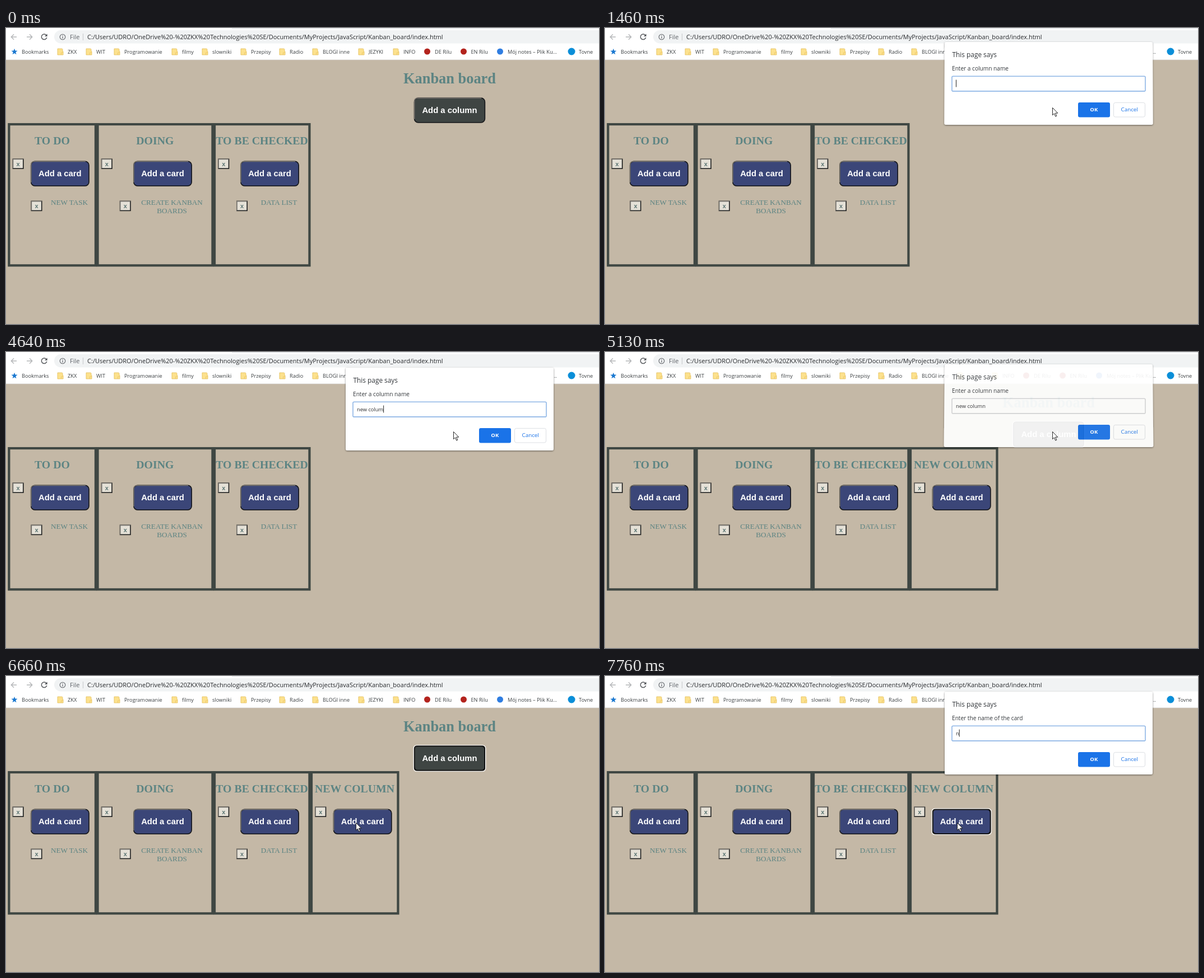
Animation of 1058 by 529 pixels, one loop 7990 ms. Source, as an HTML page:

```html
<!DOCTYPE html>
<html lang="en">
<head>
<meta charset="utf-8">
<title>Kanban board</title>
<style>
  html, body { margin: 0; width: 100%; height: 100%; overflow: hidden; background: #c4b8a6; }
  svg { display: block; width: 100vw; height: 100vh; }
  text { white-space: pre; }
  .ui { font-family: "Open Sans", "Noto Sans", sans-serif; }
  .serif { font-family: "Liberation Serif", "Times New Roman", serif; fill: #5c8483; text-anchor: middle; }
  .btn { font: bold 14.85px "Liberation Sans", Arial, sans-serif; fill: #fff; text-anchor: middle; }
  .x { font: bold 11px "Liberation Sans", Arial, sans-serif; fill: #5d7674; text-anchor: middle; }
</style>
</head>
<body>
<svg id="stage" viewBox="0 0 1058 529" xmlns="http://www.w3.org/2000/svg"></svg>
<script>
const LOOP = 7990;
const stage = document.getElementById('stage');
const $ = id => document.getElementById(id);

// --- drawing helpers ---
const rect = (x, y, w, h, attrs) => `<rect x="${x}" y="${y}" width="${w}" height="${h}" ${attrs}/>`;
const circle = (x, y, r, attrs) => `<circle cx="${x}" cy="${y}" r="${r}" ${attrs}/>`;
const text = (x, y, str, cls, attrs = '') => `<text x="${x}" y="${y}" class="${cls}" ${attrs}>${str}</text>`;
const ui = (x, y, str, size, fill, attrs = '') =>
  text(x, y, str, 'ui', `font-size="${size}" fill="${fill}" ${attrs}`);

function button(x, y, w, fill, label, id) {
  const h = 45.5, r = 7;
  const lit = `M${x + 1},${y + h - r}V${y + r}Q${x + 1},${y + 1} ${x + r},${y + 1}H${x + w - r}`;
  const ring = id
    ? `<g id="${id}" fill="none">` +
      rect(x - .4, y - .4, w + .8, h + .8, 'rx="5" stroke="#fff" stroke-width="1.3"') +
      rect(x + 1.1, y + 1.1, w - 2.2, h - 2.2, 'rx="4" stroke="#101010" stroke-width="1.8"') + '</g>'
    : '';
  return rect(x + .8, y + .8, w - 1.6, h - 1.6, `rx="${r}" fill="${fill}" stroke="#16171a" stroke-width="1.6"`) +
    `<path d="${lit}" fill="none" stroke="#77736d" stroke-width="1.6"/>` + ring +
    text(x + w / 2, y + 27.5, label, 'btn');
}

function closeBox(x, y) {
  return rect(x, y, 20, 18.5, 'fill="#1d1e1e"') +
    `<path d="M${x},${y + 18.5}V${y}H${x + 20}l-1.6,1.6H${x + 1.6}V${y + 16.9}Z" fill="#77736d"/>` +
    rect(x + 1.6, y + 1.6, 16.8, 15.3, 'fill="#e5e1d7"') +
    text(x + 10, y + 13, 'x', 'x');
}

function column(left, right, title, btnX, focusId) {
  return rect(left + 2.05, 172.05, right - left - 4.1 + 1, 252.3, 'fill="none" stroke="#3f4743" stroke-width="4.2"') +
    text((left + right) / 2 + .3, 208, title, 'serif', 'font-size="19.8" font-weight="bold"') +
    closeBox(left + 8.3, 233.5) +
    button(btnX, 237.5, 105, '#3b4678', 'Add a card', focusId);
}

const task = (boxX, x, lines) => closeBox(boxX, 308.7) +
  lines.map((s, i) => text(x, 316 + i * 15, s, 'serif', 'font-size="13.2"')).join('');

// --- browser bar ---
function browserBar() {
  const url = 'C:/Users/UDRO/OneDrive%20-%20ZKX%20Technologies%20SE/Documents/MyProjects/JavaScript/Kanban_board/index.html';
  const folders = [[110, 'ZKX'], [161, 'WIT'], [211, 'Programowanie'], [314, 'filmy'], [368, 'slowniki'],
    [437, 'Przepisy'], [506, 'Radio'], [565, 'BLOGI inne'], [647, 'JEZYKI'], [709, 'INFO']];
  const sites = [[751.5, 5.5, '#b3231d', 765, 'DE Rilu'], [816.5, 5.5, '#b3231d', 829.5, 'EN Rilu'],
    [881.5, 5.5, '#2f7de1', 895, 'Mój notes – Plik Ku...'], [1009, 6.5, '#0a8ed8', 1022, 'Tovne']];
  const label = (x, s) => ui(x, 45.5, s, 9.2, '#3c4043');
  const folder = x => `<path d="M${x + .5},37H${x + 8}q1.5,0 1.5,1.5V42h1v6H${x + .5}Z" fill="#fce18d" stroke="#e3bd5a" stroke-width=".8"/>` +
    `<path d="M${x + 7},48v-4h3.5" fill="none" stroke="#e9c566" stroke-width=".8"/>`;
  let star = '';
  for (let i = 0; i < 10; i++) {
    const a = Math.PI * (i / 5 - .5), r = i % 2 ? 2.4 : 5.8;
    star += `${15 + r * Math.cos(a)},${42.5 + r * Math.sin(a)} `;
  }
  return rect(0, 0, 1058, 57, 'fill="#fff"') +
    rect(403, 0, 655, 1, 'fill="#dee1e6"') +
    rect(0, 56.4, 1058, .8, 'fill="#dddcd9"') +
    rect(86, 4, 1000, 23.4, 'rx="11.7" fill="#f1f3f4"') +
    '<g fill="none" stroke-width="1.4">' +
    '<path d="M19,16H9.5M14,11.3L9.3,16L14,20.7M37,16h9.5M42,11.3L46.7,16L42,20.7" stroke="#b4b6b8"/>' +
    '<path d="M72.2,13.2A4.8,4.8 0 1 0 72.8,17" stroke="#55585c" stroke-width="1.5"/>' +
    circle(101, 16, 4.8, 'stroke="#5f6368" stroke-width="1.1"') +
    '<path d="M101,15.2V18.8M101,13V14.3" stroke="#5f6368" stroke-width="1.2"/></g>' +
    '<path d="M73.6,10.4V15H69Z" fill="#55585c"/>' +
    ui(114, 19.8, 'File', 11, '#5f6368') +
    rect(137, 10, 1, 12, 'fill="#c6c8ca"') +
    ui(145, 19.8, url, 11.03, '#27292c') +
    `<polygon points="${star}" fill="#1a78d0"/>` + label(28, 'Bookmarks') +
    folders.map(([x, s]) => folder(x - 18.5) + label(x, s)).join('') +
    sites.map(([cx, r, fill, x, s]) => circle(cx, 42, r, `fill="${fill}"`) + label(x, s)).join('');
}

// --- prompt window ---
const prompt = '<g id="dialog">' +
  '<path id="sheet" fill="#fff" filter="url(#shadow)"/>' +
  ui(619.5, 55, 'This page says', 11.85, '#33373b') +
  ui(619, 78.7, '', 10.13, '#33373b', 'id="question"') +
  rect(619, 89.3, 345, 26.6, 'id="field" rx="2" fill="#fff" stroke-width="1.6"') +
  ui(626, 106, '', 9.3, '#2b2d30', 'id="typed"') +
  rect(626, 95.5, 1, 13, 'id="caret" fill="#222"') +
  rect(844, 136, 57, 26.4, 'rx="3" fill="#1a73e8"') +
  ui(872.3, 152.4, 'OK', 9.6, '#fff', 'font-weight="700" text-anchor="middle"') +
  rect(907.5, 136.4, 56, 25.6, 'rx="3" fill="#fff" stroke="#dcdfe3" stroke-width="1"') +
  ui(935.7, 152.4, 'Cancel', 9.8, '#1a73e8', 'text-anchor="middle"') + '</g>';

stage.innerHTML =
  '<defs><filter id="shadow" x="-5%" y="-10%" width="110%" height="122%">' +
  '<feDropShadow dx="0" dy="1" stdDeviation="1.5" flood-color="#000" flood-opacity=".5"/></filter></defs>' +
  rect(0, 0, 1058, 529, 'fill="#c4b8a6"') +
  text(791.5, 99, 'Kanban board', 'serif', 'font-size="26.4" font-weight="bold"') +
  button(727.7, 124.3, 127.5, '#3f4543', 'Add a column', 'columnFocus') +
  column(3.3, 161, 'TO DO', 43.8) + task(44.5, 113, ['NEW TASK']) +
  column(161.5, 369.5, 'DOING', 227) + task(202.8, 296, ['CREATE KANBAN', 'BOARDS']) +
  column(370, 542.5, 'TO BE CHECKED', 418) + task(411, 487, ['DATA LIST']) +
  '<g id="newColumn">' + column(543, 700.5, 'NEW COLUMN', 583.7, 'cardFocus') + '</g>' +
  browserBar() + prompt +
  '<path id="cursor" d="M0,0V13.2L3,10.4L5.2,15.6L7.3,14.7L5.1,9.6H9.3Z" fill="#fff" stroke="#111" stroke-width=".9" stroke-linejoin="round"/>';

// --- timeline ---
// Window poses: start time, vertical shift, opacity
const poses = [
  [0, 0, 0], [1300, -11, .25], [1380, -6, .72], [1460, -3, 1], [1540, 0, 1],
  [5040, -2, 1], [5130, -6, .93], [5200, -11, .4], [5280, 0, 0],
  [6900, -11, .25], [6990, -6.4, .72], [7070, 0, 1]
];
const keys = [2860, 3010, 3160, 3310, 3860, 3940, 4170, 4340, 4640, 4820];
const toColumn = [[868, 82], [866, 98], [858, 125], [845, 155], [830, 176], [818, 183],
  [810, 178], [804, 166], [800, 153], [798, 145], [798, 142]];
const toCard = [[775, 141], [722, 157], [650, 190], [578, 230], [538, 254], [531, 263],
  [552, 265], [585, 265], [610, 264], [624, 262], [628, 262]];

const between = (t, a, b) => t >= a && t < b;
const show = (id, on) => $(id).setAttribute('visibility', on ? 'visible' : 'hidden');

function cursorAt(t) {
  const step = (path, start) => path[Math.min(path.length - 1, Math.floor((t - start) / 77.5 + .05))];
  if (t < 210) return null;
  return t < 5890 ? step(toColumn, 210) : step(toCard, 5890);
}

function draw(t) {
  const [, shift, alpha] = poses.filter(p => p[0] <= t).pop();
  const second = t >= 6000, closing = between(t, 5040, 5300);
  const spread = -shift * .22;

  show('newColumn', t >= 5040);
  show('columnFocus', between(t, 1220, 6810));
  show('cardFocus', t >= 6810);

  show('dialog', alpha > 0);
  $('dialog').setAttribute('opacity', alpha);
  $('dialog').setAttribute('transform', `translate(0 ${shift})`);
  $('sheet').setAttribute('d',
    `M609,28H974q3,0 3,3L${977 + spread},173q0,3 -3,3H${609 - spread}q-3,0 -3,-3L606,31q0,-3 3,-3Z`);
  $('question').textContent = second ? 'Enter the name of the card' : 'Enter a column name';
  $('field').setAttribute('stroke', closing ? '#d3d5d7' : '#8fb6e6');

  $('typed').textContent = second
    ? (t >= 7760 ? 'n' : '')
    : 'new column'.slice(0, keys.filter(k => k <= t).length);
  const width = $('typed').textContent ? $('typed').getComputedTextLength() : 0;
  $('caret').setAttribute('x', 626 + width);
  $('caret').setAttribute('opacity', closing || between(t, 1830, 2380) || between(t, 7440, 7760) ? 0 : 1);

  const at = cursorAt(t);
  show('cursor', at);
  if (at) $('cursor').setAttribute('transform', `translate(${at[0] + .5} ${at[1] + .5})`);
}

const start = performance.now();
function tick() {
  draw((performance.now() - start) % LOOP);
  requestAnimationFrame(tick);
}
tick();
</script>
</body>
</html>
```
